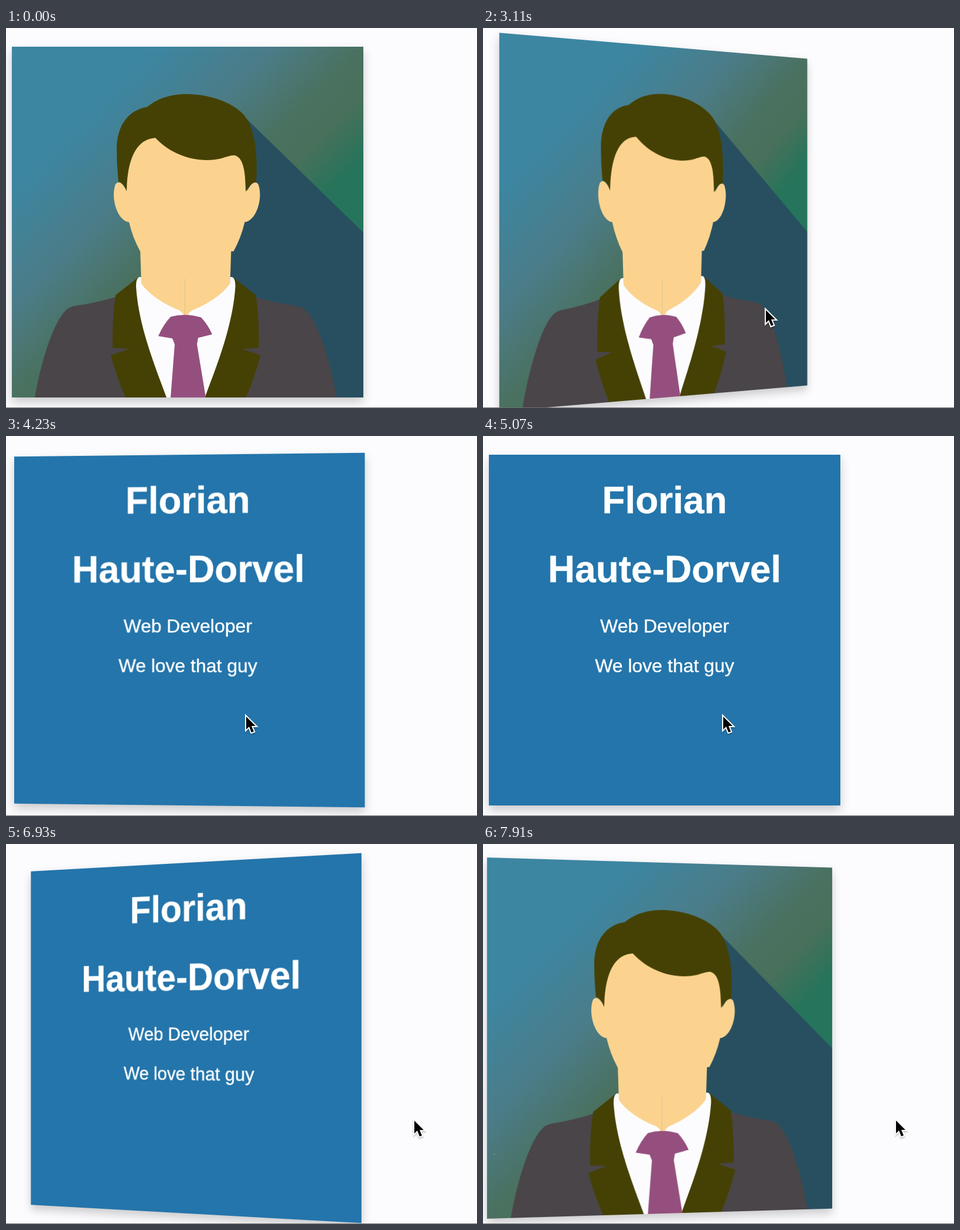
An HTML page that plays this animation: 804x650 px, repeating every 8 s.

```html
<!DOCTYPE html>
<html lang="en">
<head>
<meta charset="utf-8">
<title>Flip card</title>
<style>
  html, body { margin: 0; width: 100%; height: 100%; overflow: hidden; background: #fcfcfe; }
  #scene { position: absolute; left: 10px; top: 32px; width: 600px; height: 600px; perspective: 2000px; }
  #card { width: 600px; height: 600px; box-shadow: 0 8px 16px rgba(0, 0, 0, .2); }
  #card svg { display: block; width: 600px; height: 600px; }
  #back { font: 32px "Liberation Sans", Arial, sans-serif; fill: #fff; stroke: #fff; stroke-width: .4; text-anchor: middle; }
  #back .name { font-size: 64px; font-weight: bold; }
  #rule { position: absolute; left: 0; top: 649px; width: 804px; height: 1px; background: #707070; }
  #cursor { position: absolute; left: 0; top: 0; width: 30px; height: 42px; overflow: visible;
    filter: drop-shadow(0 2px 1px rgba(0, 0, 0, .25)); }
</style>
</head>
<body>
<div id="scene">
  <div id="card">
    <svg id="front" viewBox="10 32 600 600">
      <defs>
        <linearGradient id="sky" x1="0" y1="0" x2="1" y2="1">
          <stop offset=".2" stop-color="#3c86a2"/>
          <stop offset=".37" stop-color="#4b7c88"/>
          <stop offset=".5" stop-color="#4a7160"/>
          <stop offset=".57" stop-color="#48705a"/>
          <stop offset=".66" stop-color="#25745b"/>
        </linearGradient>
        <!-- left halves, mirrored below -->
        <g id="body">
          <path fill="#4a4548" d="M49 632C60 570 80 506 101 484Q107 477 120 475 160 469 187 460L222 430H308V632z"/>
          <path fill="#454104" d="M225 427L187 457Q181 500 182 547L210 549 179 560Q190 600 204 632H308V427z"/>
          <path fill="#fcfcfe" d="M228 426Q222 427 222 442C226 510 255 580 274 632H308V426z"/>
          <path fill="#fbd38f" d="M229 375L231 437C245 458 275 475 296 483Q303 488 303 492H308V375z"/>
        </g>
        <path id="head" fill="#fbd38f" d="M309 180H215L206 250V279Q195 257 187 267C178 290 190 330 210 332Q216 358 229 382H309z"/>
      </defs>
      <path fill="url(#sky)" d="M10 32h600v600h-600z"/>
      <path fill="#284f60" d="M400 145L610 350V632H300V400z"/>
      <use href="#body"/>
      <use href="#body" transform="translate(613.5) scale(-1 1)"/>
      <use href="#head"/>
      <use href="#head" transform="translate(617.5) scale(-1 1)"/>
      <!-- hair, tie -->
      <path fill="#454104" d="M192 263Q189 235 189 205C190 165 210 140 241 135C262 118 285 113 310 113C360 114 400 135 412 157C425 180 430 215 427 264Q417 264 409 280C409 245 405 222 391 218C385 217 375 221 368 223C330 232 285 220 255 188C222 190 207 225 206 279Q200 264 192 263z"/>
      <path fill="#954f7e" d="M281 494Q306 487 333 495 345 508 352 524L328 530 326 541 341 632H281L288 541 284 531 260 527Q268 508 281 494z"/>
    </svg>
    <svg id="back" viewBox="10 32 600 600">
      <path fill="#2475ab" stroke="none" d="M10 32h600v600h-600z"/>
      <text class="name" x="310" y="132">Florian</text>
      <text class="name" x="310" y="250">Haute-Dorvel</text>
      <text x="310" y="336">Web Developer</text>
      <text x="310" y="404">We love that guy</text>
    </svg>
  </div>
</div>
<div id="rule"></div>
<svg id="cursor" viewBox="0 0 30 42">
  <path d="M2 5V27L7 22 11 32 15 30.500 11 21H18z" stroke="#fff" stroke-width="4" paint-order="stroke"/>
</svg>
<script>
  const LOOP = 8000;
  const FLIP_TICKS = 36, ENTER = 59, LEAVE = 143;
  const START = { x: 634, y: 655 };
  const MOVES = [
    { from: 9, to: 27, x: 689, y: 485 },
    { from: 51, to: 70.5, x: 408, y: 475 },
    { from: 105, to: 127, x: 418, y: 475 },
    { from: 129, to: 149, x: 703, y: 468 }
  ];
  const byId = id => document.getElementById(id);
  const [card, front, back, cursor] = ["card", "front", "back", "cursor"].map(byId);

  // Ticks advance in threes: one long hold, then two short ones.
  function tickAt(ms) {
    if (ms < 170) return 0;
    const u = ms - 70, r = u % 140;
    return 3 * Math.floor(u / 140) + (r < 100 ? 0 : r < 120 ? 1 : 2);
  }

  const clamp = x => Math.min(1, Math.max(0, x));
  const smooth = x => x * x * (3 - 2 * x);

  // cubic-bezier(.25, .1, .25, 1)
  function ease(x) {
    if (x <= 0) return 0;
    if (x >= 1) return 1;
    const bezier = (s, a, b) => 3 * s * (1 - s) * ((1 - s) * a + s * b) + s ** 3;
    let lo = 0, hi = 1;
    for (let i = 0; i < 30; i++) {
      const mid = (lo + hi) / 2;
      if (bezier(mid, .25, .25) < x) lo = mid; else hi = mid;
    }
    return bezier(lo, .1, 1);
  }

  function cursorAt(tick) {
    let { x, y } = START;
    for (const move of MOVES) {
      const k = smooth(clamp((tick - move.from) / (move.to - move.from)));
      x += (move.x - x) * k;
      y += (move.y - y) * k;
    }
    return [x, y];
  }

  function draw(now) {
    const tick = tickAt(now % LOOP);
    const angle = 180 * (ease((tick - ENTER) / FLIP_TICKS) - ease((tick - LEAVE) / FLIP_TICKS));
    const flipped = angle > 90;
    front.style.display = flipped ? "none" : "block";
    back.style.display = flipped ? "block" : "none";
    card.style.transform = `rotateY(${flipped ? angle - 180 : angle}deg)`;
    const [x, y] = cursorAt(tick);
    cursor.style.transform = `translate(${x}px, ${y}px)`;
    requestAnimationFrame(draw);
  }
  draw(0);
</script>
</body>
</html>
```
